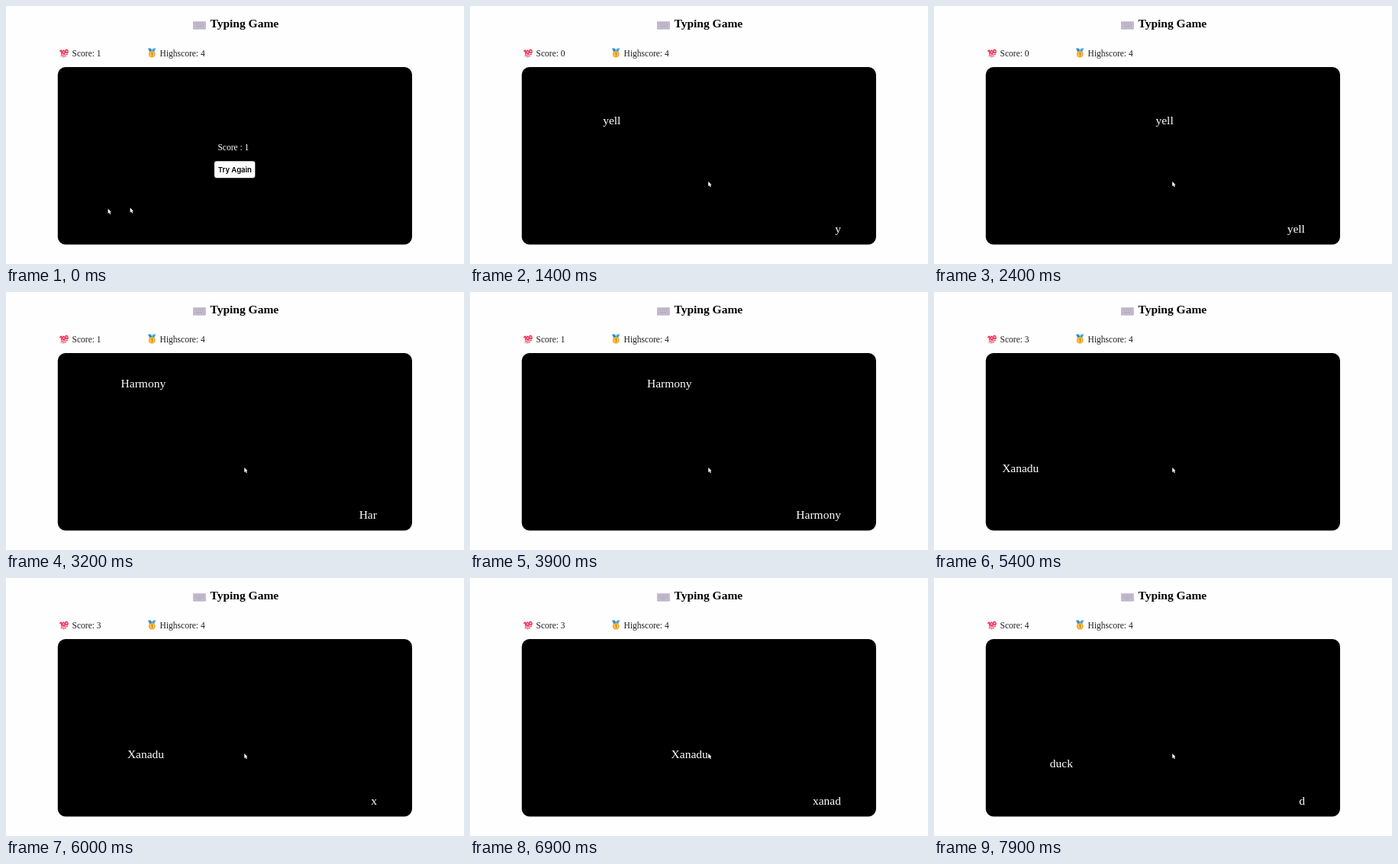
These frames come from a looping animation (600x338 px, 8000 ms). An HTML page:

```html
<!DOCTYPE html>
<html lang="en">
<head>
<meta charset="utf-8">
<title>Typing Game</title>
<style>
  html, body { margin: 0; width: 100%; height: 100%; overflow: hidden; background: #fefefe; }
  svg { display: block; width: 100vw; height: 100vh; }
  text { font-family: "Liberation Serif", "Times New Roman", serif; white-space: pre; }
  .title { font-size: 15.5px; font-weight: 700; }
  .label { font-size: 11.5px; fill: #1c1c1c; }
  .word { font-size: 15.5px; fill: #fff; }
  .button { font: 600 9.5px Inter, sans-serif; }
</style>
</head>
<body>
<svg viewBox="0 0 600 338">
  <defs>
    <path id="arrow" d="M0 0V6.3L1.5 5L2.5 7.3L3.6 6.8L2.6 4.6H4.4Z" fill="#fff"/>
  </defs>
  <rect width="600" height="338" fill="#fefefe"/>

  <g id="keyboard">
    <rect x="245" y="20" width="16.7" height="10.6" rx="1.1" fill="#aaa2b4"/>
    <rect x="245.3" y="20" width="16.1" height="9.6" rx="1" fill="#cbc4d4"/>
    <path d="M246.8 22.3H260M246.8 24.6H260" stroke="#aaa1b8" stroke-width="1.3" stroke-dasharray="1.3 .4"/>
    <path d="M246.8 27.2H248.4M249.3 27.2H257.4M258.3 27.2H260" stroke="#aaa1b8" stroke-width="1.3"/>
  </g>
  <text class="title" x="267.5" y="28">Typing Game</text>

  <g id="hundred" fill="none" stroke="#f3264f" stroke-linecap="round">
    <g stroke-width="1.5">
      <path d="M70.8 59.2L72.3 58.2L73 63.3"/>
      <ellipse cx="75.6" cy="60.4" rx="1.4" ry="2.2" transform="rotate(-10 75.6 60.4)"/>
      <ellipse cx="79.6" cy="59.4" rx="1.4" ry="2.2" transform="rotate(-10 79.6 59.4)"/>
    </g>
    <path d="M72 65.4Q76 63.7 80.6 63.5M74.6 66.8Q76.5 65.9 78.6 65.7" stroke-width="1.1"/>
  </g>
  <text class="label" id="score" x="86.6" y="65.6"></text>

  <g id="medal">
    <path d="M186 55.6H189.8L192.2 60.5L189.2 62.2Z" fill="#2a86cf"/>
    <path d="M196.4 55.6H192.6L189.6 60.5L193 62.2Z" fill="#45a3e4"/>
    <circle cx="191.2" cy="63.1" r="4.4" fill="#eea12a"/>
    <circle cx="191.2" cy="63.1" r="3.2" fill="#fbc441"/>
    <path d="M190.3 62L191.5 61.1V65.2" fill="none" stroke="#b86b1e" stroke-width=".9"/>
  </g>
  <text class="label" x="201.6" y="65.6">Highscore: 4</text>

  <rect x="67.8" y="80" width="464.2" height="232.4" rx="10"/>

  <g id="over">
    <text class="label" x="277.4" y="188.6" style="fill:#fff">Score : 1</text>
    <rect x="273" y="203.2" width="53.3" height="22" rx="3" fill="#fff"/>
    <text class="button" x="299.8" y="217.6" text-anchor="middle">Try Again</text>
  </g>

  <text class="word" id="falling"></text>
  <text class="word" id="typed" x="485.9" y="297.4" text-anchor="end"></text>
  <use id="pointer" href="#arrow"/>
  <use id="trail" href="#arrow" x="133.6" y="265.6"/>
</svg>
<script>
  const LOOP = 8000, STEP = 100, SPEED = 0.1163;
  const $ = id => document.getElementById(id);

  // Each round: start time, first x, baseline, first key time, time per key.
  const rounds = [
    { word: "yell", start: 500, x: 69.5, y: 154.6, key: 1400, pace: 300 },
    { word: "Harmony", start: 2500, x: 69.2, y: 124.5, key: 2900, pace: 150 },
    { word: "wasp", start: 4200, x: 69.8, y: 108.5, key: 4800, pace: 120 },
    { word: "Xanadu", input: "xanadu", start: 5300, x: 77.5, y: 236, key: 6000, pace: 200 },
    { word: "duck", start: 7200, x: 70.4, y: 247.6, key: 7800, pace: 200 }
  ];

  function pointerAt(t) {
    if (t < 100) return [162.6, 264.2];
    return t < 300 ? [326.2, 254.6] : [312.2, 230];
  }

  function draw(time) {
    const t = Math.floor((time % LOOP) / STEP) * STEP;
    const index = rounds.filter(r => r.start <= t).length - 1;
    const round = rounds[index];

    $("score").textContent = "Score: " + (round ? index : 1);
    $("over").style.display = round ? "none" : "";
    $("falling").textContent = round ? round.word : "";
    $("typed").textContent = "";

    if (round) {
      $("falling").setAttribute("x", round.x + (t - round.start) * SPEED);
      $("falling").setAttribute("y", round.y);
      const keys = Math.max(0, Math.floor((t - round.key) / round.pace) + 1);
      $("typed").textContent = (round.input || round.word).slice(0, keys);
    }

    const [x, y] = pointerAt(t);
    $("pointer").setAttribute("x", x);
    $("pointer").setAttribute("y", y);
    $("trail").style.display = t < 100 ? "" : "none";
  }

  const origin = performance.now();
  function tick() {
    draw(performance.now() - origin);
    requestAnimationFrame(tick);
  }
  draw(0);
  requestAnimationFrame(tick);
</script>
</body>
</html>
```
